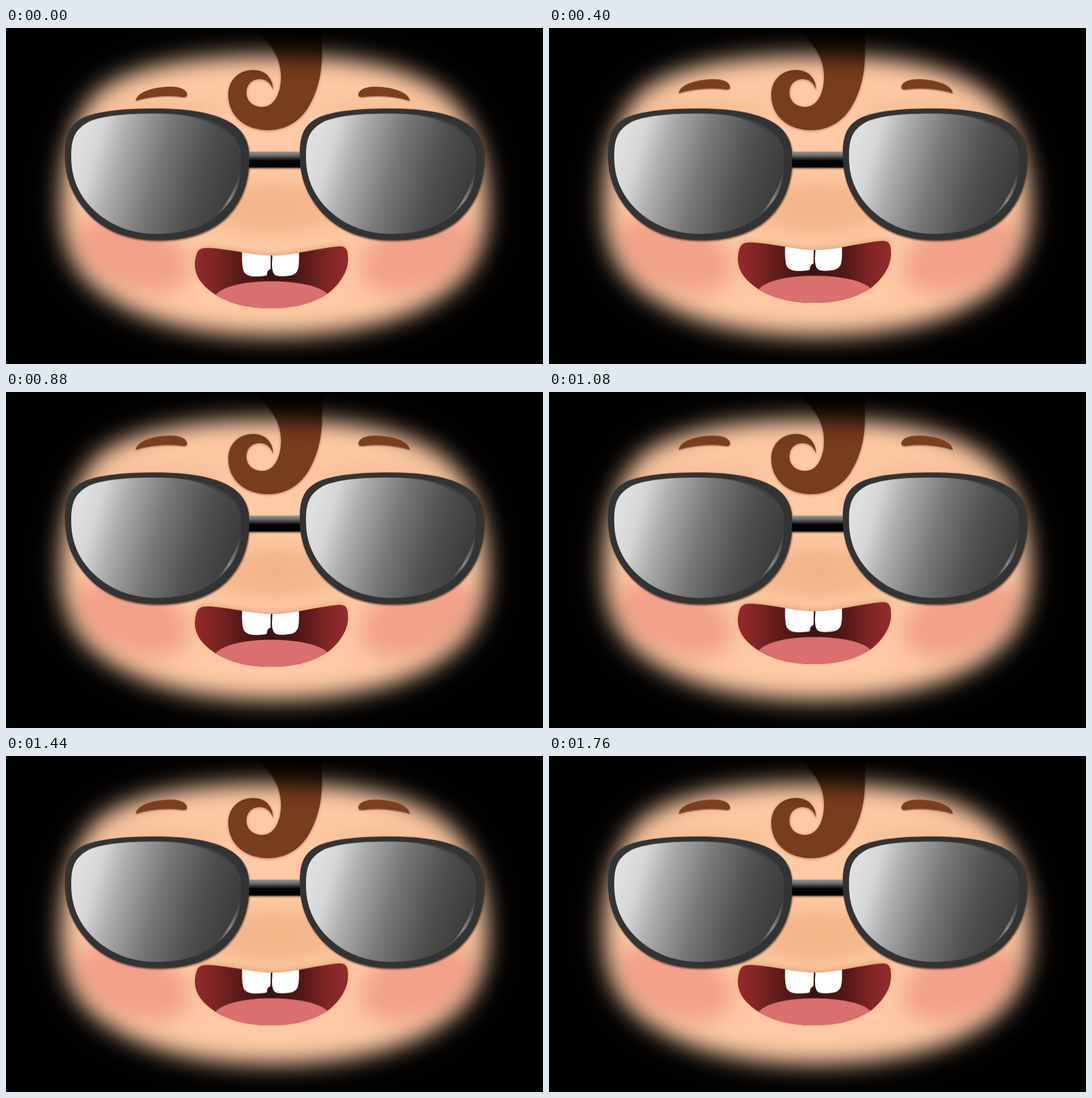
Animation, 947 px wide and 592 px high, one loop 1800 ms. Source, as an HTML page:

```html
<!DOCTYPE html>
<html lang="en">
<head>
<meta charset="utf-8">
<title>Face with sunglasses</title>
<style>
  html, body { margin: 0; width: 100%; height: 100%; overflow: hidden; background: #000; }
  svg { display: block; width: 947px; height: 592px; }

  .hair { fill: #783c1e; filter: drop-shadow(0 1px 2px rgba(90, 40, 10, .5)); }
  .brows { fill: #7a3f1f; filter: drop-shadow(0 1px 1px rgba(70, 30, 10, .7)); animation: raise 1800ms infinite; }
  .glasses { filter: drop-shadow(1px 2px 1.5px rgba(20, 10, 0, .65)); }
  .mouth {
    filter: drop-shadow(0 -3px 5px rgba(196, 128, 80, .4));
    animation: laugh 1800ms infinite;
    animation-timing-function: steps(4);
  }

  /* one loop is 45 ticks of 40 ms */
  @keyframes laugh {
    0%, 17.7777%, 35.5555%, 53.3333%, 71.1111%, 88.8888% { transform: translateY(0); }
    8.8888%, 26.6666%, 44.4444%, 62.2222%, 79.9999%, 97.7777%, 100% { transform: translateY(-19.3px); }
  }
  @keyframes raise {
    0%, 6.6666% { transform: translateY(0); animation-timing-function: steps(14); }
    37.7777%, 100% { transform: translateY(-26.6px); }
  }
</style>
</head>
<body>
<svg viewBox="0 0 947 592" xmlns="http://www.w3.org/2000/svg">
  <defs>
    <filter id="soft" filterUnits="userSpaceOnUse" x="-60" y="-60" width="1067" height="712">
      <feGaussianBlur in="SourceGraphic" stdDeviation="38" result="wide"/>
      <feComponentTransfer in="wide" result="halo"><feFuncA type="linear" slope=".2"/></feComponentTransfer>
      <feGaussianBlur in="SourceGraphic" stdDeviation="19" result="edge"/>
      <feMerge><feMergeNode in="halo"/><feMergeNode in="edge"/></feMerge>
    </filter>
    <filter id="blush" x="-60%" y="-60%" width="220%" height="220%"><feGaussianBlur stdDeviation="18"/></filter>

    <mask id="fade" maskUnits="userSpaceOnUse" x="0" y="0" width="947" height="592" style="mask-type:alpha">
      <path filter="url(#soft)" d="M473 50 C600 50 700 66 765 112 C822 152 847 230 847 310 C847 385 826 435 762 475
        C690 522 580 541 470 541 C360 541 258 522 184 475 C120 435 99 385 99 310 C99 230 118 158 165 112 C225 66 340 50 473 50Z"/>
    </mask>

    <radialGradient id="nose">
      <stop offset="0" stop-color="#f2b285"/>
      <stop offset=".4" stop-color="#f3b68a" stop-opacity=".85"/>
      <stop offset="1" stop-color="#fec9a4" stop-opacity="0"/>
    </radialGradient>

    <linearGradient id="tint" gradientUnits="userSpaceOnUse" x1="130" y1="205" x2="404" y2="285">
      <stop offset="0" stop-color="#dfdfdf"/>
      <stop offset=".1" stop-color="#d6d6d6"/>
      <stop offset=".25" stop-color="#adadad"/>
      <stop offset=".5" stop-color="#787878"/>
      <stop offset=".75" stop-color="#515151"/>
      <stop offset="1" stop-color="#3b3b3a"/>
    </linearGradient>
    <linearGradient id="glint" gradientUnits="userSpaceOnUse" x1="365" y1="335" x2="414" y2="255">
      <stop offset="0" stop-color="#888" stop-opacity="0"/>
      <stop offset=".45" stop-color="#858585"/>
      <stop offset="1" stop-color="#666" stop-opacity=".2"/>
    </linearGradient>
    <linearGradient id="bar" x2="0" y2="1">
      <stop offset="0" stop-color="#9a9a9a"/>
      <stop offset=".25" stop-color="#686868"/>
      <stop offset=".58" stop-color="#000"/>
    </linearGradient>
    <linearGradient id="throat">
      <stop offset="0" stop-color="#922b2c"/>
      <stop offset=".12" stop-color="#812526"/>
      <stop offset=".3" stop-color="#581a19"/>
      <stop offset=".5" stop-color="#3d1110"/>
      <stop offset=".7" stop-color="#541817"/>
      <stop offset=".88" stop-color="#842626"/>
      <stop offset="1" stop-color="#932c2d"/>
    </linearGradient>

    <g id="glass">
      <path fill="#333" d="M103 222 C103 185 112 168 138 156 C165 145 210 141 262 141 C315 141 358 147 388 162
        C415 176 428 196 428 228 C428 275 412 310 384 336 C352 364 310 373 267 373 C215 373 172 357 142 324 C115 294 103 262 103 222Z"/>
      <path fill="url(#tint)" d="M114 226 C114 196 119 178 146 164 C172 153 215 150 260 150 C312 150 352 157 380 174
        C405 189 414 205 414 232 C414 268 402 300 376 326 C345 354 305 362 264 362 C222 362 183 348 153 319 C126 292 114 262 114 226Z"/>
      <path fill="#434343" d="M300 151 C345 155 368 163 388 179 C404 192 413 207 414 230 C408 203 394 187 372 174 C352 162 330 155 300 151Z"/>
      <path fill="url(#glint)" d="M413 250 C411 285 397 308 366 334 C389 309 402 285 413 250Z"/>
    </g>
    <path id="brow" d="M229 128 C231 112 263 103 293 103.5 C312 104 321 112 319 119 C317 123 311 121 300 120 C274 118 247 122 229 128Z"/>
    <path id="lips" d="M340 390 C345 386 352 386.5 362 387 C395 389 435 400 470 400 C510 399 550 387 585 384
      C597 383 602 388 602 402 C604 425 590 448 568 466 C540 485 505 493 467 493 C425 493 395 485 368 469
      C343 452 332 436 332 415 C333 402 335 394 340 390Z"/>
    <clipPath id="inMouth"><use href="#lips"/></clipPath>
  </defs>

  <rect width="947" height="592"/>

  <g mask="url(#fade)">
    <rect width="947" height="592" fill="#fec9a4"/>
    <g filter="url(#blush)">
      <ellipse cx="273" cy="150" rx="115" ry="22" fill="#eeb88f" opacity=".7"/>
      <ellipse cx="668" cy="150" rx="115" ry="22" fill="#eeb88f" opacity=".7"/>
      <ellipse cx="222" cy="398" rx="106" ry="62" transform="rotate(22 222 398)" fill="#f2a089"/>
      <ellipse cx="726" cy="398" rx="106" ry="62" transform="rotate(-22 726 398)" fill="#f2a089"/>
    </g>
    <ellipse cx="473" cy="318" rx="210" ry="82" fill="url(#nose)"/>
    <path class="hair" transform="translate(1 1)" d="M556 -5 L556 45 C556 80 549 112 530 142 C513 167 488 179 461 179
      C420 179 391 153 391 117 C391 90 410 73 435 73 C457 73 470 88 470 108 C466 96 458 89 446 89 C432 89 423 99 423 113
      C423 128 435 138 451 138 C473 138 484 112 484 85 C484 58 473 36 453 16 L435 -5Z"/>
  </g>

  <g class="brows">
    <use href="#brow"/>
    <use href="#brow" transform="matrix(-1 0 0 1 941 0)"/>
  </g>

  <g transform="translate(1 .7)">
    <g class="mouth">
      <use href="#lips" fill="url(#throat)"/>
      <g clip-path="url(#inMouth)">
        <path fill="#d96f6f" d="M368 470 C382 453 424 445.5 467 445.5 C510 445.5 552 453 566 468 L560 500 L375 500Z"/>
        <path fill="#fff" d="M416 385 L466 396 L465.500 424 Q459 426 459 435 Q453 437 436 437 Q420 436 417 425 Q414 410 416 385Z"/>
        <path fill="#fff" d="M469 396 L515 385 Q517 412 514 424 Q511 435 496 436 Q479 438 473 434 Q468 430 468 415Z"/>
      </g>
    </g>

    <g class="glasses">
      <rect x="424" y="217" width="97" height="28" fill="url(#bar)"/>
      <use href="#glass"/>
      <use href="#glass" x="414"/>
    </g>
  </g>
</svg>
</body>
</html>
```
